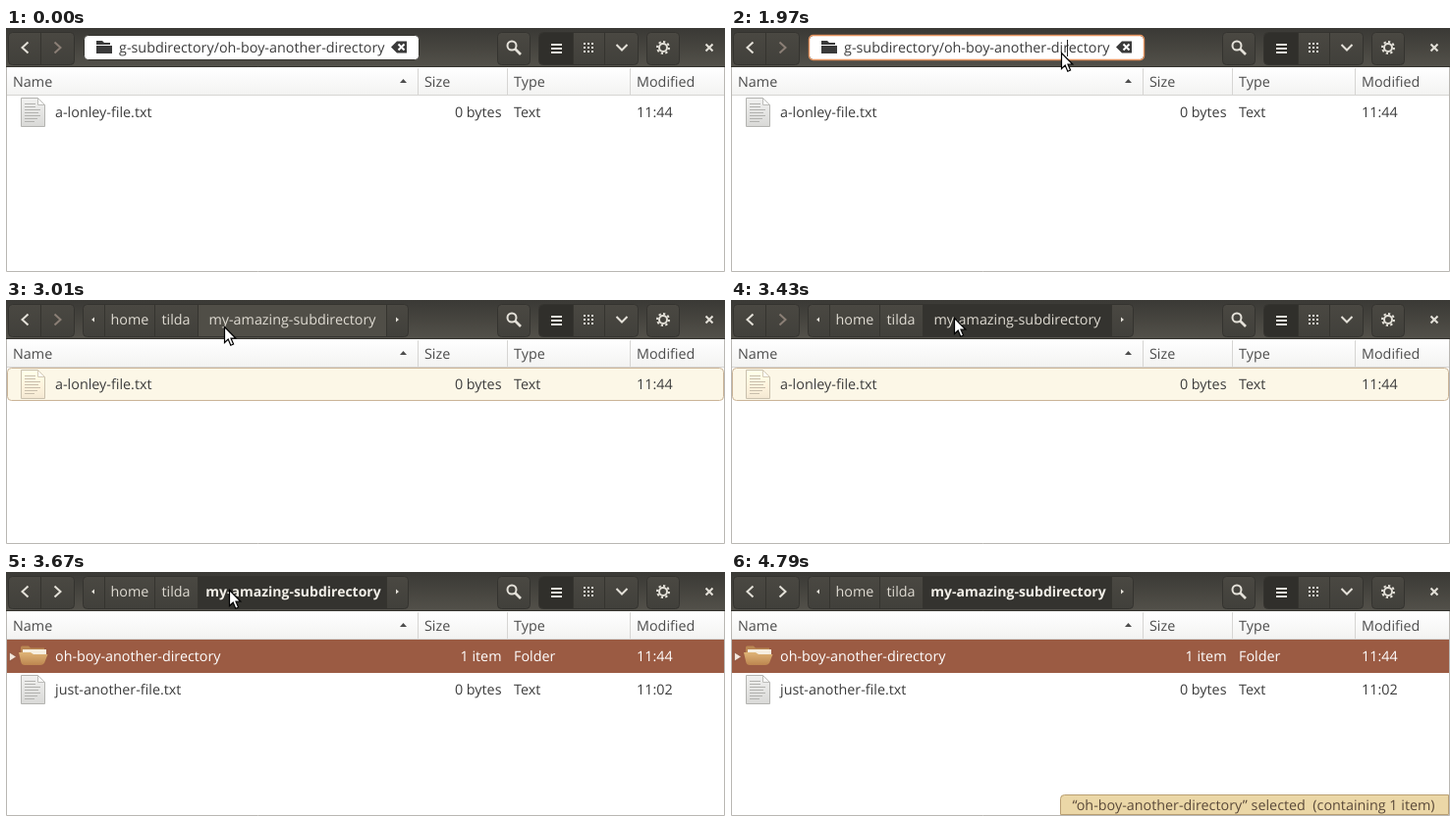
An HTML page that plays this animation: 732 px wide and 249 px high, repeating every 8840 ms.

```html
<!DOCTYPE html>
<html lang="en">
<head>
<meta charset="utf-8">
<title>File browser</title>
<style>
  html, body { margin: 0; width: 100%; height: 100%; overflow: hidden; background: #fff; }
  svg { display: block; }
  text { font: 14.35px "Open Sans", "Noto Sans", sans-serif; fill: #3c3c3c; text-rendering: geometricPrecision; white-space: pre; }
  .end { text-anchor: end; }
  .mid { text-anchor: middle; }
  .head text { fill: #4c4c4c; }
  .bar text { fill: #dfdbd2; }
  .bar .typed { fill: #3c3c3c; }
  .bar .strong { font-size: 14px; font-weight: 700; fill: #f2efe8; }
  .picked text { fill: #fff; }
  .status text { fill: #5b4a3a; }
  .button { fill: url(#button); stroke: #34332f; }
  .split { stroke: #35342f; }
  .glyph { fill: none; stroke: #e4e1d9; stroke-width: 2; }
  .solid { fill: #e4e1d9; }
  .glow { fill: #fcf7e7; stroke: #cbb497; }
  .warm { filter: sepia(.35); }
</style>
</head>
<body>
<svg width="732" height="249" viewBox="0 0 732 249">
  <defs>
    <linearGradient id="bar" x2="0" y2="1"><stop stop-color="#3a3935"/><stop offset="1" stop-color="#53514a"/></linearGradient>
    <linearGradient id="button" x2="0" y2="1"><stop stop-color="#4a4842"/><stop offset="1" stop-color="#41403b"/></linearGradient>
    <linearGradient id="head" x2="0" y2="1"><stop stop-color="#fff"/><stop offset="1" stop-color="#f3f3f2"/></linearGradient>
    <linearGradient id="paper" x2="0" y2="1"><stop stop-color="#f1f1f0"/><stop offset="1" stop-color="#d9d9d7"/></linearGradient>
    <linearGradient id="tan" x2="0" y2="1"><stop stop-color="#dfb477"/><stop offset="1" stop-color="#bd8650"/></linearGradient>
    <clipPath id="field"><rect x="114" y="8" width="276" height="24"/></clipPath>
    <g id="page">
      <path d="M.5 .5H17.5L24.5 7.5V29.5H.5Z" fill="url(#paper)" stroke="#b3b3b0"/>
      <path d="M17.5 .5V7.5H24.5Z" fill="#fbfbfa" stroke="#bdbdba"/>
      <path d="M4 6.5H15M4 9.5H15M4 12.5H20M4 15.5H18M4 18.5H20M4 21.5H17M4 24.5H14" stroke="#b2b2af"/>
    </g>
  </defs>

  <rect width="732" height="249" fill="#fff"/>
  <path d="M.5 40V248.5H731.5V40" fill="none" stroke="#b9b7b3"/>

  <g class="bar">
    <rect width="732" height="40" fill="url(#bar)"/>
    <path d="M0 39.5H732" stroke="#34332e"/>
    <rect class="button" x="2.5" y="4.5" width="67" height="33" rx="4"/>
    <path class="split" d="M35.5 5V37"/>
    <path class="glyph" d="M22.5 14.5L16.5 20L22.5 25.5"/>
    <path class="glyph" id="forward" d="M49.5 14.5L55.5 20L49.5 25.5"/>

    <rect class="button" x="500.5" y="4.5" width="33" height="33" rx="4"/>
    <circle class="glyph" cx="515" cy="18" r="4.5"/>
    <path class="glyph" d="M518 21L524 27" style="stroke-width:2.6"/>

    <rect class="button" x="542.5" y="4.5" width="101" height="33" rx="4"/>
    <path d="M577.5 5H547Q543 5 543 9V33Q543 37 547 37H577.5Z" fill="#302f2b"/>
    <path class="split" d="M577.5 5V37M609.5 5V37"/>
    <path class="glyph" d="M555 17H566M555 21H566M555 25H566"/>
    <path class="glyph" d="M588 16H598M588 20H598M588 24H598" stroke-dasharray="2 2"/>
    <path class="glyph" d="M621.5 17L627 22.5L632.5 17"/>

    <rect class="button" x="652.5" y="4.5" width="33" height="33" rx="4"/>
    <circle class="glyph" cx="669" cy="20" r="4"/>
    <circle class="glyph" cx="669" cy="20" r="6" pathLength="16" stroke-dasharray="1 1"/>
    <path class="glyph" d="M712.5 16.5L719.5 23.5M719.5 16.5L712.5 23.5"/>

    <g id="entry">
      <rect x="79.5" y="7.5" width="341" height="25" rx="4" fill="#fff" stroke="#35342f"/>
      <rect id="focus" x="79.5" y="7.5" width="341" height="25" rx="4" fill="none" stroke="#e5935f" stroke-width="1.4"/>
      <path d="M92 13H98L100 15H106V17H92ZM92 18H108V26H92Z" fill="#3a3a3a"/>
      <g clip-path="url(#field)"><text class="typed end" x="385.5" y="25">my-amazing-subdirectory/oh-boy-another-directory</text></g>
      <path d="M392 19.5L398 13.5H408V25.5H398Z" fill="#3a3a3a"/>
      <path d="M399.5 16.5L405.5 22.5M405.5 16.5L399.5 22.5" stroke="#fff" stroke-width="2"/>
      <path id="caret" d="M342.5 12V29" stroke="#222"/>
    </g>

    <g id="crumbs">
      <rect class="button" x="78.5" y="4.5" width="331" height="33" rx="4"/>
      <rect id="hover" x="196" y="5" width="191" height="32" fill="#504e47"/>
      <rect id="pressed" x="196" y="5" width="191" height="32" fill="#34332f"/>
      <path class="split" d="M100.5 5V37M151.5 5V37M195.5 5V37M387.5 5V37"/>
      <path class="solid" d="M90 17.5V22.5L87 20ZM397 17.5V22.5L400 20Z"/>
      <text class="mid" x="126" y="25">home</text>
      <text class="mid" x="173" y="25">tilda</text>
      <text class="mid" id="crumb" x="291.5" y="25">my-amazing-subdirectory</text>
      <text class="mid strong" id="crumbBold" x="292.5" y="25">my-amazing-subdirectory</text>
    </g>
  </g>

  <g class="head">
    <rect x="1" y="41" width="730" height="27" fill="url(#head)"/>
    <path d="M1 68.5H731M419.5 41V68M510.5 41V68M635.5 41V68" stroke="#d6d5d3"/>
    <text x="7" y="60">Name</text>
    <text x="426" y="60">Size</text>
    <text x="517" y="60">Type</text>
    <text x="642" y="60">Modified</text>
    <path d="M401 56H408L404.5 52Z" fill="#4c4c4c"/>
  </g>

  <g id="lonely">
    <rect class="glow" id="lit" x="1.5" y="69.5" width="729" height="33" rx="4"/>
    <use href="#page" id="lonelyIcon" x="15" y="71"/>
    <text x="50" y="91">a-lonley-file.txt</text>
    <text class="end" x="504.5" y="91">0 bytes</text>
    <text x="517" y="91">Text</text>
    <text x="642" y="91">11:44</text>
  </g>

  <rect class="glow" id="loading" x="2.5" y="70.5" width="727" height="176" rx="4"/>

  <g id="listing">
    <g class="picked">
      <rect x="1" y="69" width="730" height="34" fill="#9b5b43"/>
      <path d="M3.5 82V91L10.5 86.5Z" fill="#f3e6dc" stroke="#7d4632" stroke-width=".6"/>
      <path d="M15 84V77Q15 75.500 16.500 75.500H23L25 77.500H39V84Z" fill="#b98652"/>
      <path d="M17 79H41V84H17Z" fill="#f6eee0"/>
      <path d="M13 82H25L28 84H42.500L39 93Q37.500 95 35 95H19Q16 95 15.300 92Z" fill="url(#tan)"/>
      <text x="50" y="91">oh-boy-another-directory</text>
      <text class="end" x="504.5" y="91">1 item</text>
      <text x="517" y="91">Folder</text>
      <text x="642" y="91">11:44</text>
    </g>
    <use href="#page" x="15" y="105"/>
    <text x="50" y="125">just-another-file.txt</text>
    <text class="end" x="504.5" y="125">0 bytes</text>
    <text x="517" y="125">Text</text>
    <text x="642" y="125">11:02</text>
  </g>

  <g class="status" id="statusLeft">
    <path d="M1.500 247.500V227.500H392.500Q396.500 227.500 396.500 231.500V247.500Z" fill="#ebd7a7" stroke="#b99f72"/>
    <text x="13.500" y="243">“oh-boy-another-directory” selected&#160; (containing 1 item)</text>
  </g>
  <g class="status" id="statusRight">
    <path d="M335.500 247.500V231.500Q335.500 227.500 339.500 227.500H730.500V247.500Z" fill="#ebd7a7" stroke="#b99f72"/>
    <text x="347.500" y="243">“oh-boy-another-directory” selected&#160; (containing 1 item)</text>
  </g>

  <path id="arrow" d="M.5 .5V16.500L4.200 13L6.800 19.200L9.600 18L7 12H11.800Z" fill="#fff" stroke="#000" stroke-width="1.200"/>
  <g id="beam" fill="none">
    <path d="M-3 -8H-1L0 -7L1 -8H3M0 -7V7M-3 8H-1L0 7L1 8H3" stroke="#fff" stroke-width="3"/>
    <path d="M-3 -8H-1L0 -7L1 -8H3M0 -7V7M-3 8H-1L0 7L1 8H3" stroke="#111" stroke-width="1.200"/>
  </g>
</svg>
<script>
const LOOP = 8840, TICK = 40;
const $ = id => document.getElementById(id);

// Visible spans: id, from, to (ms)
const spans = [
  ['entry', 0, 2010], ['focus', 1530, 2010], ['caret', 1530, 2010],
  ['crumbs', 2010, LOOP], ['hover', 2930, 3300], ['pressed', 3300, LOOP],
  ['crumb', 2010, 3600], ['crumbBold', 3600, LOOP],
  ['lonely', 0, 3600], ['lit', 2130, 3600],
  ['loading', 3600, 3670], ['listing', 3670, LOOP],
  ['statusLeft', 3850, 4710], ['statusRight', 4710, LOOP],
  ['beam', 1000, 1970]
];

// Pointer stops: time, x, y; a fourth value glides on to the next stop
const stops = [
  [870, 338, 40], [930, 338, 34], [1000, 346, 24], [1060, 346, 20], [1220, 347, 20],
  [1410, 346, 20, 1], [1530, 342, 21, 1], [1970, 336, 25, 1],
  [2130, 326, 69, 1], [2330, 314, 122, 1], [2410, 311, 144, 1], [2490, 307, 154, 1],
  [2610, 289, 137, 1], [2770, 254, 84, 1], [2890, 231, 43, 1], [3010, 222, 27, 1],
  [3170, 227, 18], [4230, 227, 18, 1], [4430, 234, 66, 1], [4630, 245, 172, 1], [4790, 254, 249]
];

function pointerAt(t) {
  const i = stops.findLastIndex(s => s[0] <= t);
  if (i < 0 || i === stops.length - 1) return null;
  const [t0, x0, y0, glide] = stops[i], [t1, x1, y1] = stops[i + 1];
  const k = glide ? Math.floor((t - t0) / TICK) * TICK / (t1 - t0) : 0;
  return [Math.round(x0 + (x1 - x0) * k), Math.round(y0 + (y1 - y0) * k)];
}

const show = (id, on) => { $(id).style.display = on ? '' : 'none'; };

function draw(t) {
  for (const [id, from, to] of spans) show(id, t >= from && t < to);
  $('forward').style.stroke = t < 3600 ? '#8b7f76' : '';
  $('lonelyIcon').setAttribute('class', t >= 2130 ? 'warm' : '');
  const at = pointerAt(t), beam = t >= 1000 && t < 1970;
  show('arrow', at && !beam);
  if (at) $(beam ? 'beam' : 'arrow').setAttribute('transform', `translate(${at})`);
}

const start = performance.now();
function frame() {
  draw((performance.now() - start) % LOOP);
  requestAnimationFrame(frame);
}
frame();
</script>
</body>
</html>
```
